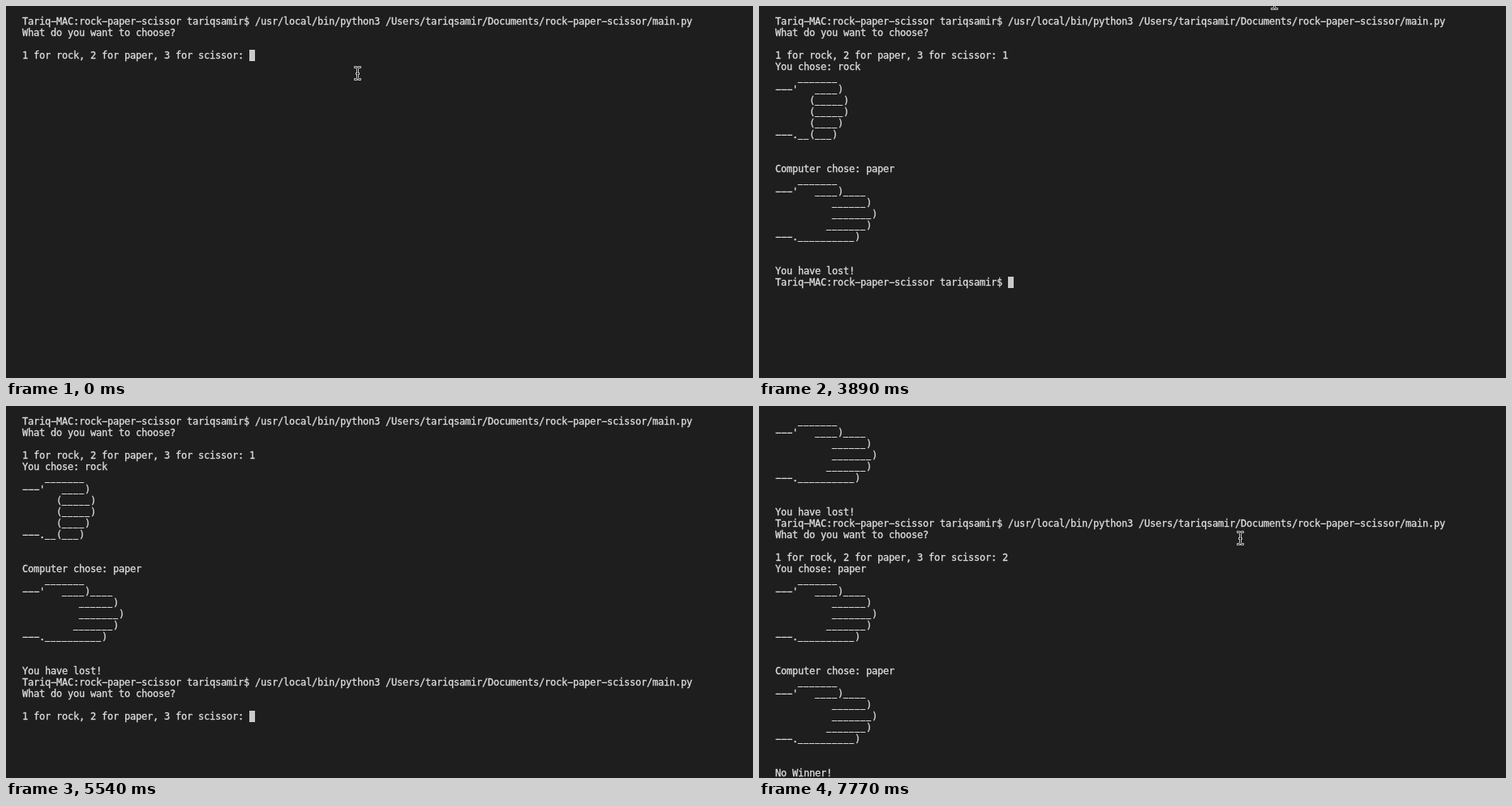
An HTML page that plays this animation: 921 px wide and 459 px high, repeating every 8000 ms.

```html
<!DOCTYPE html>
<html lang="en">
<head>
<meta charset="utf-8">
<title>Rock paper scissor in a terminal</title>
<style>
  html, body {
    margin: 0;
    width: 100%;
    height: 100%;
    overflow: hidden;
    background: #1e1e1e;
  }
  #stage {
    position: relative;
    width: 921px;
    height: 459px;
    overflow: hidden;
  }
  #screen {
    position: absolute;
    left: 20px;
    top: 12px;
    margin: 0;
    font: 12px/14px "DejaVu Sans Mono", monospace;
    letter-spacing: var(--gap);
    color: #dedede;
    -webkit-text-stroke: 0.3px #dedede;
    white-space: pre;
  }
  /* Short, raised underscores with a gap between them */
  #screen .low {
    position: relative;
    top: -1px;
    font-size: 10px;
    line-height: 0;
    letter-spacing: var(--low-gap);
    -webkit-text-stroke-width: 0.5px;
  }
  #caret {
    position: absolute;
    width: 7px;
    height: 14px;
    background: #cacaca;
  }
  #pointer {
    position: absolute;
    left: 0;
    top: 0;
    fill: none;
    stroke-linecap: square;
  }
</style>
</head>
<body>
<div id="stage">
  <pre id="screen"></pre>
  <div id="caret"></div>
  <svg id="pointer" width="9" height="18" viewBox="0 0 9 18">
    <defs>
      <path id="beam" d="M1.5 1.5H2.5Q4.5 1.5 4.5 4V14Q4.5 16.5 2.5 16.5H1.5M7.5 1.5H6.5Q4.5 1.5 4.5 4M4.5 14Q4.5 16.5 6.5 16.5H7.5M3.5 9.5H5.5"/>
    </defs>
    <use href="#beam" stroke="#f2f2f2" stroke-width="2.6"/>
    <use href="#beam" stroke="#111" stroke-width="1"/>
  </svg>
</div>
<script>
const LOOP = 8000, CELL_W = 7, CELL_H = 14, LEFT = 20, TOP = 12;
const screen = document.getElementById('screen');
const caret = document.getElementById('caret');
const pointer = document.getElementById('pointer');

const prompt = 'Tariq-MAC:rock-paper-scissor tariqsamir$ ';
const command = '/usr/local/bin/python3 /Users/tariqsamir/Documents/rock-paper-scissor/main.py';
const question = ['What do you want to choose?', '', '1 for rock, 2 for paper, 3 for scissor: '];

const hands = {
  rock: [
    '    _______',
    "---'   ____)",
    '      (_____)',
    '      (_____)',
    '      (____)',
    '---.__(___)'
  ],
  paper: [
    '    _______',
    "---'   ____)____",
    '          ______)',
    '          _______)',
    '         _______)',
    '---.__________)'
  ]
};

const ask = [prompt + command, ...question].join('\n');
const turn = (who, hand) => [`${who} chose: ${hand}`, ...hands[hand], '', ''];
const round = (key, mine, theirs, verdict) =>
  [key, ...turn('You', mine), ...turn('Computer', theirs), verdict, prompt].join('\n');

const first = ask + round('1', 'rock', 'paper', 'You have lost!');
const second = first + ask.slice(prompt.length);

// Terminal states: start time, full output, lines scrolled off the top
const states = [
  [0, ask, 0],
  [600, ask + '1', 0],
  [2100, first, 0],
  [5540, second, 0],
  [7180, second + '2', 0],
  [7770, second + round('2', 'paper', 'paper', 'No Winner!'), 14]
];

// Mouse pointer: start time, left, top
const moves = [
  [0, 429, 74],
  [3890, 631, -13],
  [4040, 0, -40],
  [6130, 589, 154]
];

const at = (table, t) => table.findLast(row => row[0] <= t);

// Letter spacing that puts a text style on the terminal's character grid
function gridGap(className) {
  const probe = document.createElement('span');
  probe.className = className;
  probe.style.letterSpacing = 0;
  probe.textContent = '_'.repeat(100);
  screen.append(probe);
  const advance = probe.getBoundingClientRect().width / 100;
  probe.remove();
  return `${CELL_W - advance}px`;
}

// The terminal face has wide hyphens
const markup = text => text
  .replaceAll('-', '\u2212')
  .replace(/_+/g, '<span class="low">$&</span>');

let shown;

function draw(t) {
  const state = at(states, t);
  if (state !== shown) {
    const lines = state[1].split('\n').slice(state[2]);
    screen.innerHTML = markup(lines.join('\n'));
    caret.style.left = `${LEFT + lines.at(-1).length * CELL_W}px`;
    caret.style.top = `${TOP + (lines.length - 1) * CELL_H}px`;
    shown = state;
  }
  const [, x, y] = at(moves, t);
  pointer.style.transform = `translate(${x}px, ${y}px)`;
}

screen.style.setProperty('--gap', gridGap(''));
screen.style.setProperty('--low-gap', gridGap('low'));
draw(0);
const start = performance.now();
requestAnimationFrame(function tick() {
  draw((performance.now() - start) % LOOP);
  requestAnimationFrame(tick);
});
</script>
</body>
</html>
```
